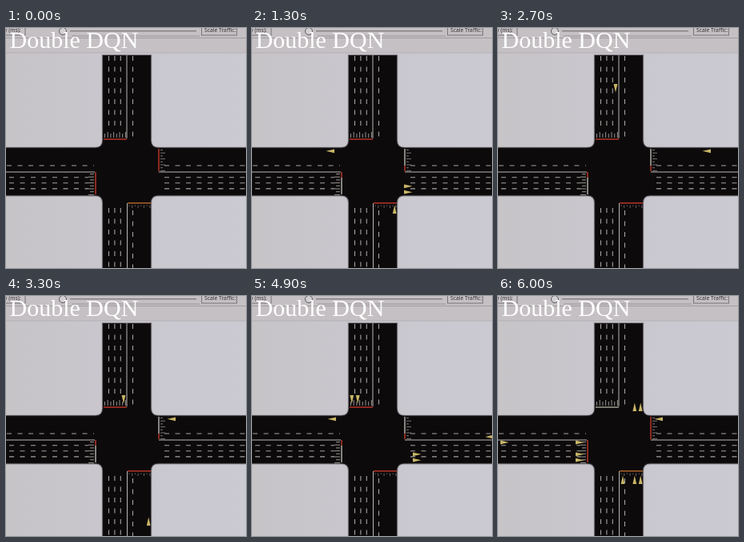
These frames come from a looping animation (300x300 px, 6.1 s). An HTML page with a canvas:

```html
<!DOCTYPE html>
<html lang="en">
<head>
<meta charset="utf-8">
<title>Double DQN</title>
<style>
  html, body { margin: 0; width: 100%; height: 100%; overflow: hidden; background: #c9c7cd; }
  canvas { display: block; width: 100vw; height: 100vh; }
</style>
</head>
<body>
<canvas id="stage"></canvas>
<script>
const LOOP = 6100, STEP = 100, SIZE = 300;
const SPEED = 0.09; // px per ms
const LANE = 7.4;
const ROAD = { left: 120.7, right: 181.3, top: 149.6, bottom: 209.5, start: 34, bend: 9 };
const INK = {
  road: '#0d0a0b', mark: '#bab8b4', dash: '#a5a39f',
  red: '#c2382a', amber: '#b8682c', green: '#57988a', pale: '#a9a99c'
};

const canvas = document.getElementById('stage');
const ctx = canvas.getContext('2d');

// Headings: unit vector and the innermost lane, counted outwards.
const HEADINGS = {
  right: { dx: 1, dy: 0, first: 183, out: 1 },
  left: { dx: -1, dy: 0, first: 176, out: -1 },
  up: { dx: 0, dy: -1, first: 156, out: 1 },
  down: { dx: 0, dy: 1, first: 147, out: -1 }
};

// A platoon reaches pos at its scene's key time; "stops" waits there, "passes" drives on.
const passes = (heading, lanes, pos) => ({ heading, lanes, pos, waits: false });
const stops = (heading, lanes, pos) => ({ heading, lanes, pos, waits: true });

// Signals are [through lanes, inner turning lane].
const RED = ['red', 'red'], GO = ['mark', 'red'], GREEN = ['green', 'red'];
const PALE = ['pale', 'pale'], AMBER = ['amber', 'amber'];

const scenes = [
  { from: 0, key: 0, n: RED, s: AMBER, ew: RED, traffic: [] },
  { from: 100, key: 1300, n: RED, s: RED, ew: GO, traffic: [
    passes('left', [3], 98), passes('right', [2, 3], 195), stops('up', [3], 227)] },
  { from: 1500, key: 2100, n: PALE, s: PALE, ew: RED, traffic: [
    passes('left', [3], 47), passes('right', [3], 266), passes('right', [0], 204),
    stops('left', [3], 201), passes('down', [0], 121), passes('up', [3], 283)] },
  { from: 2700, key: 3300, n: RED, s: RED, ew: GO, traffic: [
    stops('down', [0], 129), stops('left', [3], 207), stops('up', [3], 282)] },
  { from: 3500, key: 4100, n: GREEN, s: GREEN, ew: RED, traffic: [
    passes('up', [1, 2, 3], 131), passes('up', [2, 3], 171)] },
  { from: 4800, key: 4900, n: RED, s: RED, ew: GO, traffic: [
    stops('down', [2, 3], 129), passes('left', [3], 100), passes('left', [0], 297),
    passes('right', [2, 3], 206)] },
  { from: 5500, key: 6000, n: PALE, s: AMBER, ew: RED, traffic: [
    passes('up', [2, 3], 139), stops('up', [0, 2, 3], 230), stops('left', [3], 201),
    passes('right', [0], 8), stops('right', [0, 2, 3], 102)] }
];

function line(x1, y1, x2, y2, color, width = 1, dash = []) {
  ctx.strokeStyle = color;
  ctx.lineWidth = width;
  ctx.setLineDash(dash);
  ctx.beginPath();
  ctx.moveTo(x1, y1);
  ctx.lineTo(x2, y2);
  ctx.stroke();
  ctx.setLineDash([]);
}

function drawPanel() {
  const bg = ctx.createLinearGradient(0, 0, SIZE, 0);
  bg.addColorStop(0, '#c7c4c8');
  bg.addColorStop(1, '#cbcad3');
  ctx.fillStyle = bg;
  ctx.fillRect(0, 0, SIZE, SIZE);
  ctx.fillStyle = '#c5c0c3';
  ctx.fillRect(0, 0, SIZE, 31);
  line(0, 12.5, SIZE, 12.5, '#a19da0');
  line(0, 31, SIZE, 31, '#b3afb3');

  ctx.strokeStyle = '#77747a';
  ctx.lineWidth = 1;
  ctx.strokeRect(-2, -3, 26, 12);
  ctx.strokeRect(244.5, -3, 44, 12);
  line(80, 3.8, 238, 3.8, '#67646a');
  line(82, 10, 242, 10, '#969397');
  ctx.fillStyle = '#d3d0d2';
  ctx.strokeStyle = '#5d5a60';
  ctx.beginPath();
  ctx.arc(71, 4, 4.5, 0, Math.PI * 2);
  ctx.fill();
  ctx.stroke();

  ctx.fillStyle = '#2b292e';
  ctx.font = '6.8px "Open Sans", sans-serif';
  ctx.fillText('y (ms):', -2, 5);
  ctx.fillText('Scale Traffic:', 248, 5);
  ctx.fillStyle = '#fff';
  ctx.font = '30px "Liberation Serif", "Times New Roman", serif';
  ctx.fillText('Double DQN', 4.5, 25);
}

function drawAsphalt() {
  const { left, right, top, bottom, start, bend } = ROAD;
  ctx.beginPath();
  ctx.moveTo(left, start);
  ctx.lineTo(left, top - bend);
  ctx.quadraticCurveTo(left, top, left - bend, top);
  ctx.lineTo(-2, top);
  ctx.lineTo(-2, bottom);
  ctx.lineTo(left - bend, bottom);
  ctx.quadraticCurveTo(left, bottom, left, bottom + bend);
  ctx.lineTo(left, SIZE + 2);
  ctx.lineTo(right, SIZE + 2);
  ctx.lineTo(right, bottom + bend);
  ctx.quadraticCurveTo(right, bottom, right + bend, bottom);
  ctx.lineTo(SIZE + 2, bottom);
  ctx.lineTo(SIZE + 2, top);
  ctx.lineTo(right + bend, top);
  ctx.quadraticCurveTo(right, top, right, top - bend);
  ctx.lineTo(right, start);
  ctx.closePath();
  ctx.fillStyle = INK.road;
  ctx.fill();
  // Soft edge, as seen through a camera.
  ctx.strokeStyle = 'rgba(50, 46, 50, 0.4)';
  ctx.lineWidth = 1.8;
  ctx.stroke();
}

function drawMarks() {
  const dash = [6, 7.5];
  for (let i = 0; i < 3; i++) {
    const x = 128.5 + i * LANE, y = 186.7 + i * 7.1;
    line(x, 35, x, 129, INK.dash, 1.1, dash);
    line(x, 225, x, SIZE, INK.dash, 1.1, dash);
    line(4, y, 103, y, INK.dash, 1.1, dash);
    line(198, y, SIZE, y, INK.dash, 1.1, dash);
  }
  line(158.5, 35, 158.5, 137, INK.dash, 1.1, dash);
  line(158.5, 228, 158.5, SIZE, INK.dash, 1.1, dash);
  line(1, 172, 110, 172, INK.dash, 1.1, dash);
  line(198, 172, SIZE, 172, INK.dash, 1.1, dash);

  line(151, 34, 151, 138, INK.mark);
  line(151.5, 219, 151.5, SIZE, INK.mark);
  line(0, 180, 111, 180, INK.mark);
  line(191, 180, SIZE, 180, INK.mark);

  // Lane arrows and dividers in front of the stop lines.
  for (let i = 0; i < 8; i++) {
    const d = i * LANE / 2, long = i % 2;
    line(123.5 + d, long ? 130 : 132, 123.5 + d, 137, INK.dash, 0.9);
    line(long ? 103 : 105, 182.5 + d, 110, 182.5 + d, INK.dash, 0.9);
    line(193, 152.5 + d, long ? 199 : 196, 152.5 + d, INK.dash, 0.7);
    line(154 + d, 221.5, 154 + d, long ? 225 : 223, INK.dash, 0.6);
  }
}

function drawSignals({ n, s, ew }) {
  const width = 1.4;
  line(122, 139, 144, 139, INK[n[0]], width);
  line(144, 139, 151, 139, INK[n[1]], width);
  line(159, 218.8, 181, 218.8, INK[s[0]], width);
  line(152, 218.8, 159, 218.8, INK[s[1]], width);
  line(191, 151, 191, 172, INK[ew[0]], width);
  line(191, 172, 191, 179, INK[ew[1]], width);
  line(112, 187, 112, 208, INK[ew[0]], width);
  line(112, 180, 112, 187, INK[ew[1]], width);
}

function drawCar(x, y, angle) {
  ctx.save();
  ctx.translate(x, y);
  ctx.rotate(angle);
  ctx.beginPath();
  ctx.moveTo(5.5, 0);
  ctx.lineTo(-5, -2.4);
  ctx.lineTo(-5, 2.4);
  ctx.fill();
  ctx.restore();
}

function drawTraffic({ key, traffic }, t) {
  ctx.fillStyle = '#c9b667';
  for (const { heading, lanes, pos, waits } of traffic) {
    const { dx, dy, first, out } = HEADINGS[heading];
    const elapsed = waits ? Math.min(0, t - key) : t - key;
    const along = pos + (dx + dy) * SPEED * elapsed;
    if (dy && along < ROAD.start + 6) continue;
    for (const lane of lanes) {
      const across = first + out * lane * LANE;
      drawCar(dx ? along : across, dx ? across : along, Math.atan2(dy, dx));
    }
  }
}

function render(now) {
  const t = Math.floor(now % LOOP / STEP) * STEP;
  const w = Math.round(innerWidth * devicePixelRatio);
  const h = Math.round(innerHeight * devicePixelRatio);
  if (canvas.width !== w || canvas.height !== h) {
    canvas.width = w;
    canvas.height = h;
  }
  ctx.setTransform(w / SIZE, 0, 0, h / SIZE, 0, 0);
  const scene = scenes.filter(s => s.from <= t).pop();
  drawPanel();
  drawAsphalt();
  drawMarks();
  drawSignals(scene);
  drawTraffic(scene, t);
}

const start = performance.now();
function tick() {
  render(performance.now() - start);
  requestAnimationFrame(tick);
}
tick();
</script>
</body>
</html>
```
